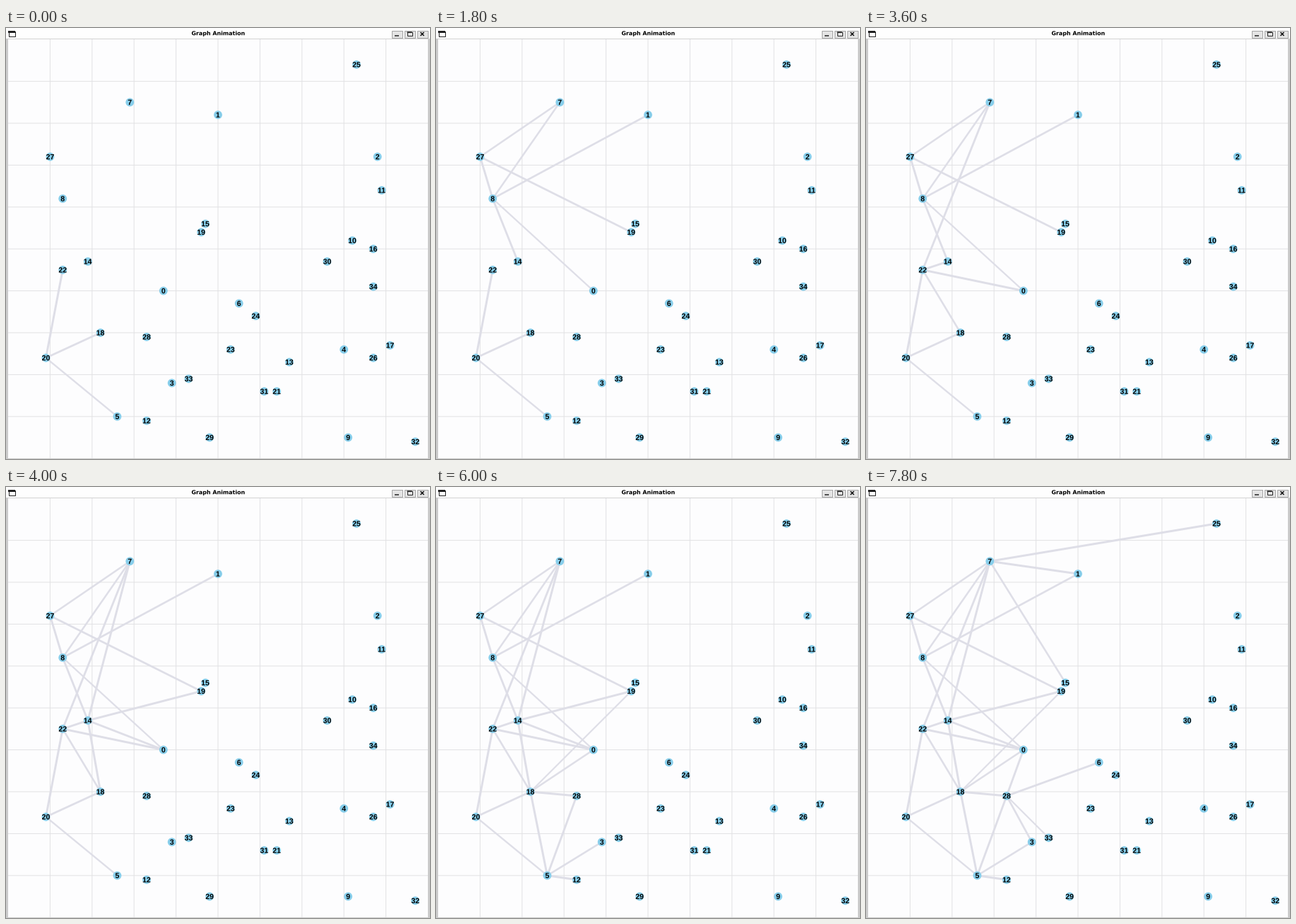
Write a matplotlib script that moves like this. It is 600 px wide and 611 px high and loops after 8 s.

```python
import math

import matplotlib.pyplot as plt
from matplotlib.animation import FuncAnimation
from matplotlib.patches import Circle, PathPatch, Rectangle
from matplotlib.textpath import TextPath
from matplotlib.transforms import Affine2D

W, H, DPI = 600, 611, 100
PX = 72 / DPI
UNIT, LEFT, BASE, TOP = 5.94, 3, 610.2, 16
FRAMES, INTERVAL, HOLD = 40, 200, 5

# Node positions on a 100 x 100 plane; the index is the label.
NODES = [
    (37, 40), (50, 82), (88, 72), (39, 18), (80, 26), (26, 10), (55, 37),
    (29, 85), (13, 62), (81, 5), (82, 52), (89, 64), (33, 9), (67, 23),
    (19, 47), (47, 56), (87, 50), (91, 27), (22, 30), (46, 54), (9, 24),
    (64, 16), (13, 45), (53, 26), (59, 34), (83, 94), (87, 24), (10, 72),
    (33, 29), (48, 5), (76, 47), (61, 16), (97, 4), (43, 19), (87, 41),
]

fig = plt.figure(figsize=(W / DPI, H / DPI), dpi=DPI, facecolor="#fdfdfe")
ax = fig.add_axes([0, 0, 1, 1])
ax.set_xlim(0, W)
ax.set_ylim(H, 0)
ax.axis("off")


def nearest_by_octant(node):
    """Closest node to the right of this one in each 45 degree cone."""
    best = {}
    for other in NODES:
        dx, dy = other[0] - node[0], other[1] - node[1]
        if dx > 0:
            cone = math.floor(math.atan2(dy, dx) / (math.pi / 4))
            best[cone] = min(best.get(cone, other), other,
                             key=lambda p: math.dist(p, node))
    return best.values()


def to_px(x, y):
    return LEFT + UNIT * x, BASE - UNIT * y


def line(xs, ys, color, width, z):
    return ax.plot(xs, ys, color=color, lw=width * PX, zorder=z,
                   solid_capstyle="butt", snap=False)[0]


def rect(x, y, w, h, face, z, edge="none"):
    ax.add_patch(Rectangle((x, y), w, h, fc=face, ec=edge, lw=PX, zorder=z))


def label(x, y, text, size, family):
    """Draw bold text with its ink centred on (x, y)."""
    path = TextPath((0, 0), text, size=size,
                    prop={"family": family, "weight": "bold"})
    box = path.get_extents()
    cx, cy = (box.x0 + box.x1) / 2, (box.y0 + box.y1) / 2
    place = Affine2D().translate(-cx, -cy).scale(1, -1).translate(x, y)
    ax.add_patch(PathPatch(place.transform_path(path), fc="black", lw=0,
                           zorder=6))


def edge(a, b):
    (x0, y0), (x1, y1) = to_px(*a), to_px(*b)
    # Aliased strokes get thinner towards the diagonal.
    width = 3 * max(abs(x1 - x0), abs(y1 - y0)) / math.dist((x0, y0), (x1, y1))
    return line([x0, x1], [y0, y1], "#dedee7", width, 2)


def draw_grid():
    for k in range(10, 100, 10):
        x, y = to_px(k, k)
        line([x, x], [TOP, H], "#e2e2e4", 1, 1)
        line([0, W], [y, y], "#e2e2e4", 1, 1)


def draw_window():
    rect(0, 0, W, TOP - 0.5, "#fefefe", 4)
    rect(0, TOP - 1, W, 1, "#d2d2d2", 4)
    for x in (0, W - LEFT):
        rect(x, TOP - 1, LEFT, H, "#cbcbcb", 4)
    rect(0, H - 1, W, 1, "#cbcbcb", 4)
    label(W / 2 + 0.2, 8, "Graph Animation", 7.95, "DejaVu Sans")

    rect(3.5, 4.5, 9, 7, "white", 5, "#202020")
    rect(3, 4, 10, 2.6, "#202020", 5)

    minimise, maximise, close = (553 + 18 * k for k in range(3))
    for x in (minimise, maximise, close):
        rect(x - 7.5, 3.5, 15, 10, "#e4e4e4", 5, "#a4a4a4")
    line([minimise - 3, minimise + 3], [11, 11], "#111111", 1.4, 6)
    rect(maximise - 3.5, 5.5, 7, 5.5, "none", 6, "#222222")
    line([maximise - 3.5, maximise + 3.5], [6, 6], "#222222", 1.5, 6)
    for s in (-1, 1):
        line([close - 2.5, close + 2.5], [8.5 - 2.5 * s, 8.5 + 2.5 * s],
             "#111111", 1.5, 6)


def draw_nodes():
    for i, node in enumerate(NODES):
        x, y = to_px(*node)
        ax.add_patch(Circle((x, y), 5.9, fc="#87ceeb", lw=0, zorder=3))
        label(x, y, str(i), 10.5, "Liberation Sans")


draw_grid()
draw_window()
draw_nodes()

# Sweep from left to right, top first among equal x.
sweep = sorted(NODES, key=lambda p: (p[0], -p[1]))
groups = [[edge(a, b) for b in nearest_by_octant(a)]
          for a in sweep[:FRAMES // HOLD + 1]]


def update(frame):
    step = (frame + 1) // HOLD
    for k, group in enumerate(groups):
        for ln in group:
            ln.set_visible(k <= step)
    return [ln for group in groups for ln in group]


anim = FuncAnimation(fig, update, frames=FRAMES, interval=INTERVAL,
                     repeat=True, repeat_delay=0, blit=False)
plt.show()
```
